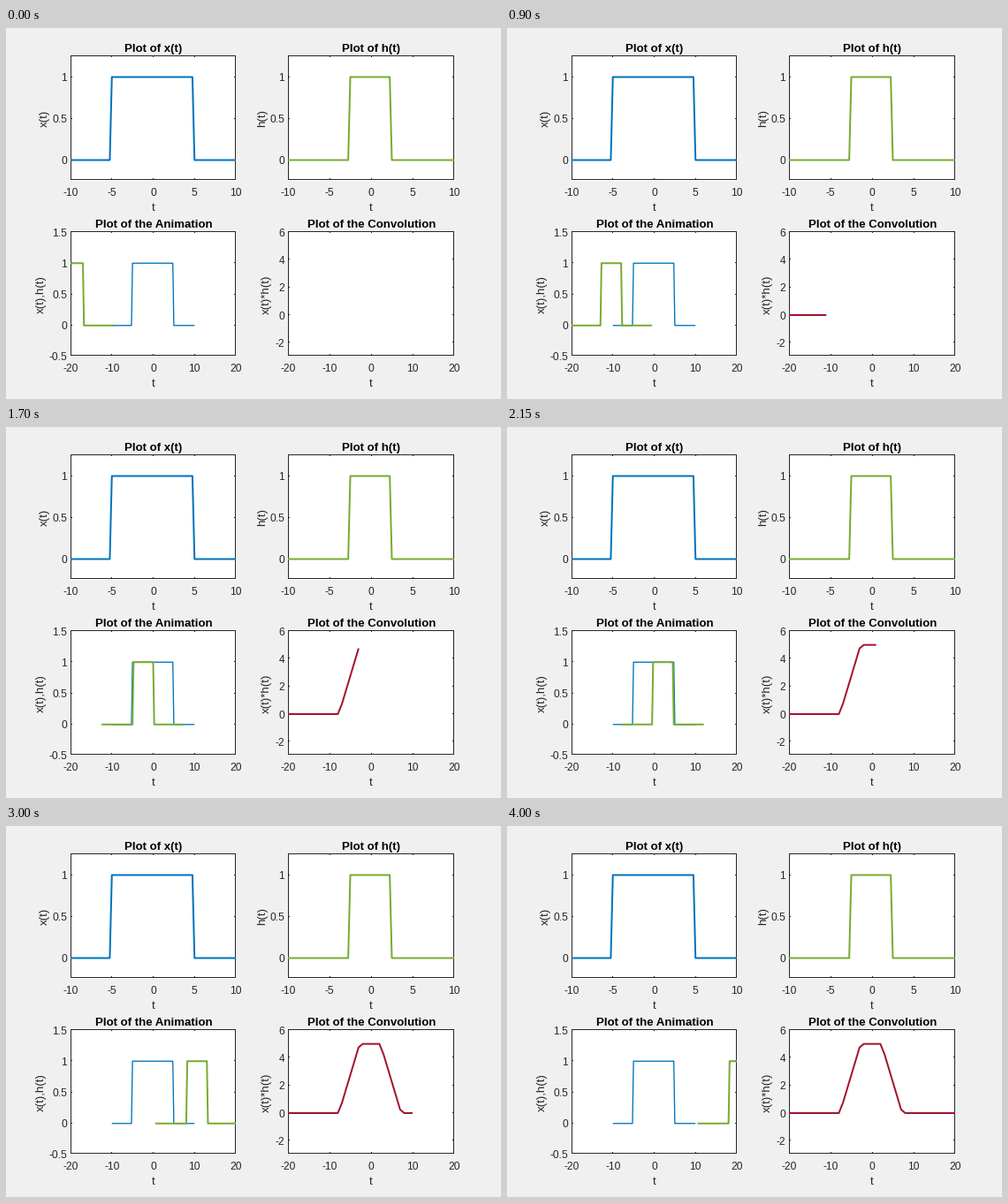
Recreate the animation shown at these times as a matplotlib script. Size 560 px wide and 420 px high, loop 4.05 s.

```python
import numpy as np
import matplotlib.pyplot as plt
from matplotlib.animation import FuncAnimation
from matplotlib.transforms import Affine2D

W, H = 560, 420
BLUE, GREEN, WINE = "#0072BD", "#77AC30", "#A2142F"
INK = "#262626"
DT = 0.25

plt.rcParams["font.family"] = "Liberation Sans"
plt.rcParams["toolbar"] = "None"

fig = plt.figure(figsize=(W / 100, H / 100), dpi=100, facecolor="#F0F0F0")

# Pixel coordinates measured from the top left
PIXELS = Affine2D().scale(1 / W, -1 / H).translate(0, 1) + fig.transFigure


def px(v):
    """Pixels to points."""
    return v * 0.72


def label(x, y, s, size=12, **kw):
    kw = {"ha": "center", "va": "baseline", "color": INK, **kw}
    fig.text(x, y, s, fontsize=px(size), transform=PIXELS, **kw)


def fill(ax, x, y, w, h):
    """Dark pixel-aligned bar, drawn below the curves."""
    ax.add_patch(plt.Rectangle((x, y), w, h, transform=PIXELS, facecolor=INK,
                               linewidth=0, clip_on=False, zorder=1))


def panel(left, top, right, bottom, xlim, ylim, xticks, yticks, title, ylabel, ylabel_x):
    w, h = right - left, bottom - top
    ax = fig.add_axes([left / W, 1 - bottom / H, w / W, h / H])
    ax.set(xlim=xlim, ylim=ylim, xticks=[], yticks=[])
    ax.spines[:].set_visible(False)

    # The one-pixel frame sits a pixel above the data area
    y0, y1 = top - 1, bottom - 1
    fill(ax, left, y0, w, 1)
    fill(ax, left, y1 - 1, w, 1)
    fill(ax, left, y0, 1, h)
    fill(ax, right - 1, y0, 1, h)

    mid = (left + right) / 2
    for t in xticks:
        x = left + w * (t - xlim[0]) / (xlim[1] - xlim[0])
        label(x, bottom + 17, f"{t:g}")
        if xlim[0] < t < xlim[1]:
            fill(ax, np.floor(x), y0, 1, 2)
            fill(ax, np.floor(x), y1 - 2, 1, 2)
    for t in yticks:
        y = bottom - h * (t - ylim[0]) / (ylim[1] - ylim[0])
        label(left - 4, y + 4.5, f"{t:g}", ha="right")
        if ylim[0] < t < ylim[1]:
            fill(ax, left, np.floor(y - 0.5), 2, 1)
            fill(ax, right - 2, np.floor(y - 0.5), 2, 1)
    label(mid + 0.5, top - 5, title, 13.2, weight="bold", color="black")
    label(mid, bottom + 34, "t", 13.2)
    label(ylabel_x, (top + bottom) / 2, ylabel, 13.2, rotation=90, va="center")
    return ax


def curve(ax, x, y, color, width=2):
    line, = ax.plot(x, y, color=color, lw=px(width), snap=False,
                    solid_capstyle="butt", solid_joinstyle="round")
    return line


# Sampled pulses and their convolution
t = np.arange(-10, 10 + DT, DT)
x = ((t >= -5) & (t < 5)).astype(float)
h = ((t >= -2.5) & (t < 2.5)).astype(float)
conv = DT * np.convolve(x, h)
step = int(1 / DT)
tc, yc = np.arange(-20, 21), conv[::step]

narrow, wide = range(-10, 11, 5), range(-20, 21, 10)
ax_x = panel(73, 32, 260, 173, (-10, 10), (-0.25, 1.25), narrow, (0, 0.5, 1),
             "Plot of x(t)", "x(t)", 44)
ax_h = panel(319, 32, 507, 173, (-10, 10), (-0.25, 1.25), narrow, (0, 0.5, 1),
             "Plot of h(t)", "h(t)", 290)
ax_s = panel(73, 231, 260, 372, (-20, 20), (-0.5, 1.5), wide, (-0.5, 0, 0.5, 1, 1.5),
             "Plot of the Animation", "x(t),h(t)", 39.5)
ax_c = panel(319, 231, 507, 372, (-20, 20), (-3, 6), wide, (-2, 0, 2, 4, 6),
             "Plot of the Convolution", "x(t)*h(t)", 294.5)

curve(ax_x, t, x, BLUE)
curve(ax_h, t, h, GREEN)
curve(ax_s, t, x, BLUE, 1.33)
sliding = curve(ax_s, [], [], GREEN)
result = curve(ax_c, [], [], WINE)


def update(k):
    sliding.set_data(t - 19.5 + 0.5 * k, h[::-1])
    n = k // 2 + 1
    result.set_data(tc[:n], yc[:n])
    return sliding, result


anim = FuncAnimation(fig, update, frames=81, interval=50, repeat=True, repeat_delay=0)
plt.show()
```
